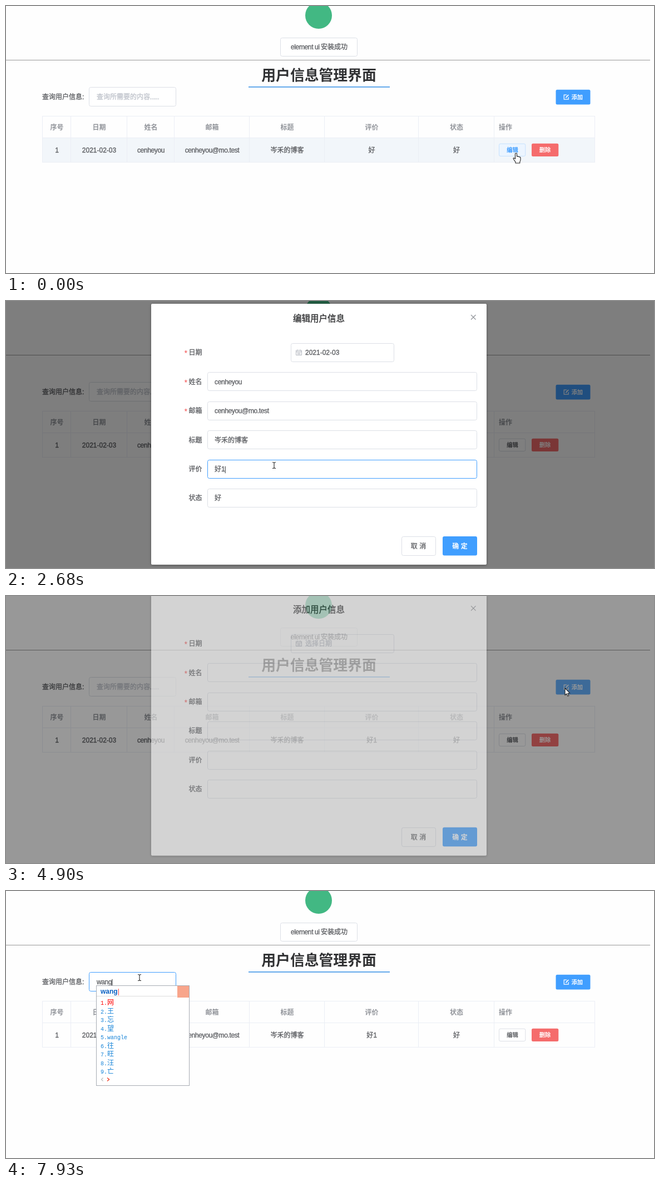
An HTML page for the animation above (8000 ms loop, 1165 by 481 pixels).

```html
<!DOCTYPE html>
<html lang="zh-CN">
<head>
<meta charset="utf-8">
<title>用户信息管理界面</title>
<style>
  html, body { margin: 0; width: 100%; height: 100%; overflow: hidden; background: #fefefe; }
  svg { display: block; width: 1165px; height: 481px; }
  text {
    font: 500 12px "Liberation Sans", "Noto Sans CJK SC", "Noto Sans CJK", sans-serif; white-space: pre;
    color: #606266; fill: currentColor; stroke: currentColor; stroke-width: .35px;
  }
  .tight { letter-spacing: -.37px; }
  .head { font-weight: 700; color: #909399; stroke: none; }
  .hint { color: #c0c4cc; }
  .small { font-size: 10.3px; }
  .white { color: #fff; font-weight: 700; stroke: none; }
  .mid { text-anchor: middle; }
  .end { text-anchor: end; }
  .title { font-size: 25.8px; font-weight: 700; color: #303133; stroke: none; }
  .heading { font-size: 15.5px; color: #303133; }
  .word { font-weight: 700; color: #0a60c2; stroke: none; }
  .word tspan { font-weight: 400; fill: #f33; }
  .field, .plain { fill: #fff; stroke: #dcdfe6; }
  .mono { font-family: "Liberation Mono", monospace; font-size: 10px; color: #1583d8; stroke: none; }
  .mono tspan { font: 400 12px "Noto Sans CJK SC", "Noto Sans CJK", sans-serif; }
  #panel { filter: drop-shadow(0 1px 2px rgba(0, 0, 0, .35)); }
</style>
</head>
<body>
<svg id="stage" viewBox="0 0 1165 481"></svg>
<script>
const TICK = 77.5, LOOP = 8000;
const GREY = '#606266', BLUE = '#409eff', LIGHT = '#66b1ff', LINE = '#dcdfe6';
const USER = 'cenheyou', MAIL = USER + '@mo.test', BLOG = '岑禾的博客', DATE = '2021-02-03';

// Markup helpers; text is placed by its vertical centre.
const box = (x, y, w, h, attrs = '', r = 3) =>
  `<rect x="${x + .5}" y="${y + .5}" width="${w - 1}" height="${h - 1}" rx="${r}" ${attrs}/>`;
const text = (x, cy, str, cls = '', attrs = '', size = 12) =>
  `<text x="${x}" y="${cy + size * .37}" class="${cls}" ${attrs}>${str}</text>`;
const line = (d, color, attrs = '') => `<path d="${d}" fill="none" stroke="${color}" ${attrs}/>`;

function pageMarkup() {
  const cols = [66, 117, 218, 303, 438, 573, 742, 878, 1059];
  const heads = ['序号', '日期', '姓名', '邮箱', '标题', '评价', '状态'];
  const cells = ['1', DATE, USER, MAIL, BLOG, '好', '好'];
  const mid = i => (cols[i] + cols[i + 1]) / 2;
  const grid = cols.map(x => `M${x - .5} 198V282`).join('') + 'M65 198.5H1059M65 237.5H1059M65 281.5H1059';
  return `<rect width="1165" height="481" fill="#fefefe"/>
    <circle cx="562" cy="17" r="24" fill="#42b883"/>
    ${box(493, 57, 139, 34, 'class="plain"')}
    ${text(512, 74, 'element ui', 'tight')}${text(566, 74, '安装成功')}
    ${line('M0 97.5H1158', '#999')}
    ${text(562.5, 124.5, '用户信息管理界面', 'mid title', '', 25.8)}
    <rect x="436" y="145" width="254" height="1.7" fill="#4a9be8"/>
    ${text(65, 164, '查询用户信息:')}
    ${box(149, 146, 157, 35, 'class="field" id="search"')}
    <g id="searchHint">${text(163, 164, '查询所需要的内容', 'hint')}${text(258.5, 164, '......', 'hint', 'letter-spacing="-.6"')}</g>
    ${text(163, 164, '', 'tight', 'id="typed"')}
    <rect x="988.5" y="150.7" width="62" height="26.8" rx="2.5" id="add"/>
    ${line('M1008 160.2H1003.2V168.2H1011.2V164', '#fff', 'stroke-width="1.2"')}
    ${line('M1006.4 165.2L1011.3 160', '#fff', 'stroke-width="1.8"')}
    ${text(1016.5, 164, '添加', 'small white', '', 10.3)}
    <rect x="66" y="238" width="993" height="43" fill="#f2f6fa" id="row"/>
    ${line(grid, '#ebeef5')}
    ${heads.map((h, i) => text(mid(i), 218.5, h, 'head mid')).join('')}
    ${text(886, 218.5, '操作', 'head')}
    ${cells.map((c, i) => text(mid(i), 260, c, i === 2 || i === 3 ? 'mid tight' : 'mid', `id="cell${i}"`)).join('')}
    ${box(886, 247.7, 48.3, 23.3, 'id="edit"', 2.5)}
    ${text(910.5, 259, '编辑', 'small mid', 'id="editText"', 10.3)}
    <rect x="945" y="247.7" width="48.3" height="23.3" rx="2.5" fill="#f56c6c"/>
    ${text(969, 259, '删除', 'small white mid', '', 10.3)}`;
}

function dialogMarkup() {
  const labels = ['日期', '姓名', '邮箱', '标题', '评价', '状态'];
  const rows = labels.map((label, i) => {
    const cy = 93 + i * 52.4, top = Math.round(cy - 17);
    const star = i < 3 ? text(321, cy + 1, '*', '', 'style="color:#f56c6c"') : '';
    const field = i ? box(362, top, 485, 34, `class="field" id="field${i}"`) : box(512, top, 186, 34, 'class="field"');
    return star + text(352.5, cy, label, 'end') + field +
      text(i ? 375 : 538, cy, '', i === 1 || i === 2 ? 'tight' : '', `id="value${i}"`);
  });
  return `<rect x="261" y="5" width="603" height="470" rx="2" fill="#fff" id="panel"/>
    ${text(562.5, 31, '', 'mid heading', 'id="heading"', 15.5)}
    ${line('M836 25L844.5 33.5M844.5 25L836 33.5', '#909399', 'stroke-width="1.2"')}
    ${rows.join('')}
    ${line('M521.5 89H531.5V97.5H521.5ZM521.5 91.5H531.5M524 87.5V90M529 87.5V90M523.5 93.7H529.5M523.5 95.6H529.5', '#b4b8c0')}
    ${box(711, 424, 62, 35, 'id="cancel"')}
    ${text(741.5, 441.5, '取 消', 'mid', 'id="cancelText"')}
    <rect x="785" y="424" width="62" height="34.5" rx="3" id="ok"/>
    ${text(816, 441.5, '确 定', 'mid white')}`;
}

const CURSORS = {
  a: '<path d="M0 0V12.6L2.9 10L4.8 14.4L6.8 13.5L4.9 9.2H8.8Z"/>',
  h: '<path d="M-1.5 8.5V1Q0-1 1.5 1V6Q3 5 4 6.5Q5.5 5.8 6.3 7.2Q7.8 6.8 8 8.3V12Q8 14 6.8 15.5V18H-1V16Q-2 14-4 11.8Q-5.5 9.5-4.5 8.8Q-3 8.5-1.5 10.5Z"/>',
  i: '<path d="M-3-5.5Q0-5.5 0-4Q0-5.5 3-5.5M0-4.5V5M-3 5.5Q0 5.5 0 4Q0 5.5 3 5.5" fill="none"/>'
};

const CANDIDATES = {
  w: '我 为 万 无 问 玩 网 外 位', wa: '哇 挖 娃 瓦 袜 蛙 洼 凹 娲',
  wan: '完 万 玩 晚 碗 湾 弯 丸 挽', wang: '网 王 忘 望 wangle 往 旺 汪 亡'
};

function imeMarkup(word) {
  const right = word === 'wang' ? 330 : 295;
  const list = CANDIDATES[word].split(' ').map((c, i) => {
    const cell = c.length > 1 ? c : `<tspan>${c}</tspan>`;
    return text(170, 201 + i * 15.5, `${i + 1}.${cell}`, 'mono', i ? '' : 'style="color:#f00"', 11);
  });
  return `${box(162, 170, right - 162, 181, 'fill="#fff" stroke="#a8acb4"', 0)}
    ${text(170, 181, `${word}<tspan>|</tspan>`, 'word')}
    ${line(`M163 189.5H${right - 23}`, '#dcdcdc')}
    <rect x="${right - 22}" y="171" width="21" height="21" fill="#f8a58b"/>
    ${list.join('')}
    ${line('M174.5 336.5L171.5 339.5L174.5 342.5', '#bbb', 'stroke-width="1.2"')}
    ${line('M182 336.5L185.5 339.5L182 342.5', '#f0432c', 'stroke-width="1.5"')}`;
}

const stage = document.getElementById('stage');
stage.innerHTML = `${pageMarkup()}<g id="ime"></g>
  <rect width="1165" height="481" id="shade"/>
  <g id="dialog">${dialogMarkup()}</g>
  <circle cx="1" cy="-1" r="10" fill="#e6e600" opacity=".6" id="ring"/>
  <g id="cursor" fill="#fff" stroke="#222" stroke-width="1.1" stroke-linejoin="round"></g>`;
const $ = id => document.getElementById(id);
const set = (id, attrs) => { for (const key in attrs) $(id).setAttribute(key, attrs[key]); };
const paint = (id, fill, stroke) => Object.assign($(id).style, { fill, stroke: stroke || 'none' });

// Pointer path: tick, x, y
const PATH = [
  [0, 917, 265], [11, 917, 265], [12, 800, 290], [14, 551, 325], [15, 551, 325], [16, 538, 326], [18, 482, 298],
  [34, 482, 296], [36, 510, 312], [38, 610, 372], [40, 745, 425], [42, 802, 436], [52, 802, 436],
  [53, 840, 388], [54, 871, 346], [55, 871, 346], [57, 925, 280], [60, 1005, 166], [69, 1005, 166],
  [72, 930, 250], [75, 850, 340], [79, 759, 446], [82, 759, 446], [85, 715, 360], [86, 715, 360],
  [89, 560, 290], [93, 260, 165], [94, 240, 156], [110, 240, 156]
];
// Pointer shape from a tick on
const SHAPES = [[0, 'h'], [4, 'a'], [25, 'i'], [31, ''], [34, 'i'], [37, 'a'], [41, 'h'], [48, 'a'],
  [60, 'h'], [62, 'a'], [79, 'h'], [83, 'a'], [93, 'i']];

const latest = (list, k) => list.filter(e => e[0] <= k).pop()[1];

function pointerAt(k) {
  const i = PATH.findIndex((p, n) => k < PATH[n + 1][0]);
  const [t0, x0, y0] = PATH[i], [t1, x1, y1] = PATH[i + 1], f = (k - t0) / (t1 - t0);
  return { x: x0 + (x1 - x0) * f, y: y0 + (y1 - y0) * f };
}

// CSS "ease", cubic-bezier(.25, .1, .25, 1)
function ease(x) {
  if (x <= 0) return 0;
  if (x >= 1) return 1;
  const curve = (u, a, b) => 3 * u * (1 - u) ** 2 * a + 3 * u * u * (1 - u) * b + u ** 3;
  let lo = 0, hi = 1;
  for (let n = 0; n < 24; n++) {
    const m = (lo + hi) / 2;
    if (curve(m, .25, .25) < x) lo = m; else hi = m;
  }
  return curve(lo, .1, 1);
}

function drawDialog(k, now) {
  const adding = k >= 55;
  const [open, close] = adding ? [4782, 6289] : [285, 3375];
  const visible = ms => ease((now - open) / ms) * (1 - ease((now - close) / ms));
  const shown = visible(300);
  set('shade', { opacity: visible(200) * .5 });
  set('dialog', { opacity: shown, transform: `translate(0 ${-17 * (1 - shown)})` });
  $('heading').textContent = adding ? '添加用户信息' : '编辑用户信息';

  const caret = (k >= 21 && k < 27) || (k >= 31 && k < 38) ? '<tspan dx="-1">|</tspan>' : '';
  const values = adding ? ['选择日期', '', '', '', '', '']
    : [DATE, USER, MAIL, BLOG, (k < 31 ? '好' : '好1') + caret, '好'];
  values.forEach((v, i) => { $('value' + i).innerHTML = v; });
  $('value0').style.color = adding ? '#c0c4cc' : GREY;

  const hover = '#c0c4cc';
  $('field4').style.stroke = k >= 20 && k < 43 ? BLUE : k >= 17 && k < 20 ? hover : LINE;
  $('field5').style.stroke = k === 75 || k === 76 ? hover : LINE;
  const onCancel = k >= 79;
  paint('cancel', onCancel ? '#ecf5ff' : '#fff', onCancel ? '#c6e2ff' : LINE);
  $('cancelText').style.color = onCancel ? BLUE : GREY;
  paint('ok', k >= 41 && k < 50 ? LIGHT : BLUE);
  return shown > 0;
}

function drawPage(k, pointer, covered) {
  const overRow = pointer.y > 238 && pointer.y < 281;
  $('row').style.display = k < 5 || (!covered && overRow) ? '' : 'none';
  const active = k < 20;
  paint('edit', active ? '#ecf5ff' : '#fff', active ? '#c6e2ff' : LINE);
  $('editText').style.color = k < 1 ? BLUE : active ? '#3a8ee6' : GREY;
  $('cell5').textContent = k < 44 ? '好' : '好1';
  paint('add', k === 60 || k === 61 ? '#4c9ffa' : k > 61 && k < 81 ? LIGHT : BLUE);

  const word = 'wang'.slice(0, latest([[0, 0], [96, 1], [99, 2], [101, 3], [102, 4]], k));
  $('search').style.stroke = k >= 94 ? BLUE : LINE;
  $('searchHint').style.display = word ? 'none' : '';
  $('typed').innerHTML = k >= 94 ? word + '<tspan dx="-1">|</tspan>' : '';
  $('ime').innerHTML = word ? imeMarkup(word) : '';
}

function draw(ms) {
  const k = Math.floor((ms + 20) / TICK), pointer = pointerAt(k);
  drawPage(k, pointer, drawDialog(k, k * TICK));
  const place = `translate(${pointer.x} ${pointer.y})`;
  set('cursor', { transform: place });
  $('cursor').innerHTML = CURSORS[latest(SHAPES, k)] || '';
  set('ring', { transform: place });
  $('ring').style.display = [3, 20, 21, 43, 61, 81].includes(k) ? '' : 'none';
}

const begin = performance.now();
function frame() {
  draw((performance.now() - begin) % LOOP);
  requestAnimationFrame(frame);
}
frame();
</script>
</body>
</html>
```
